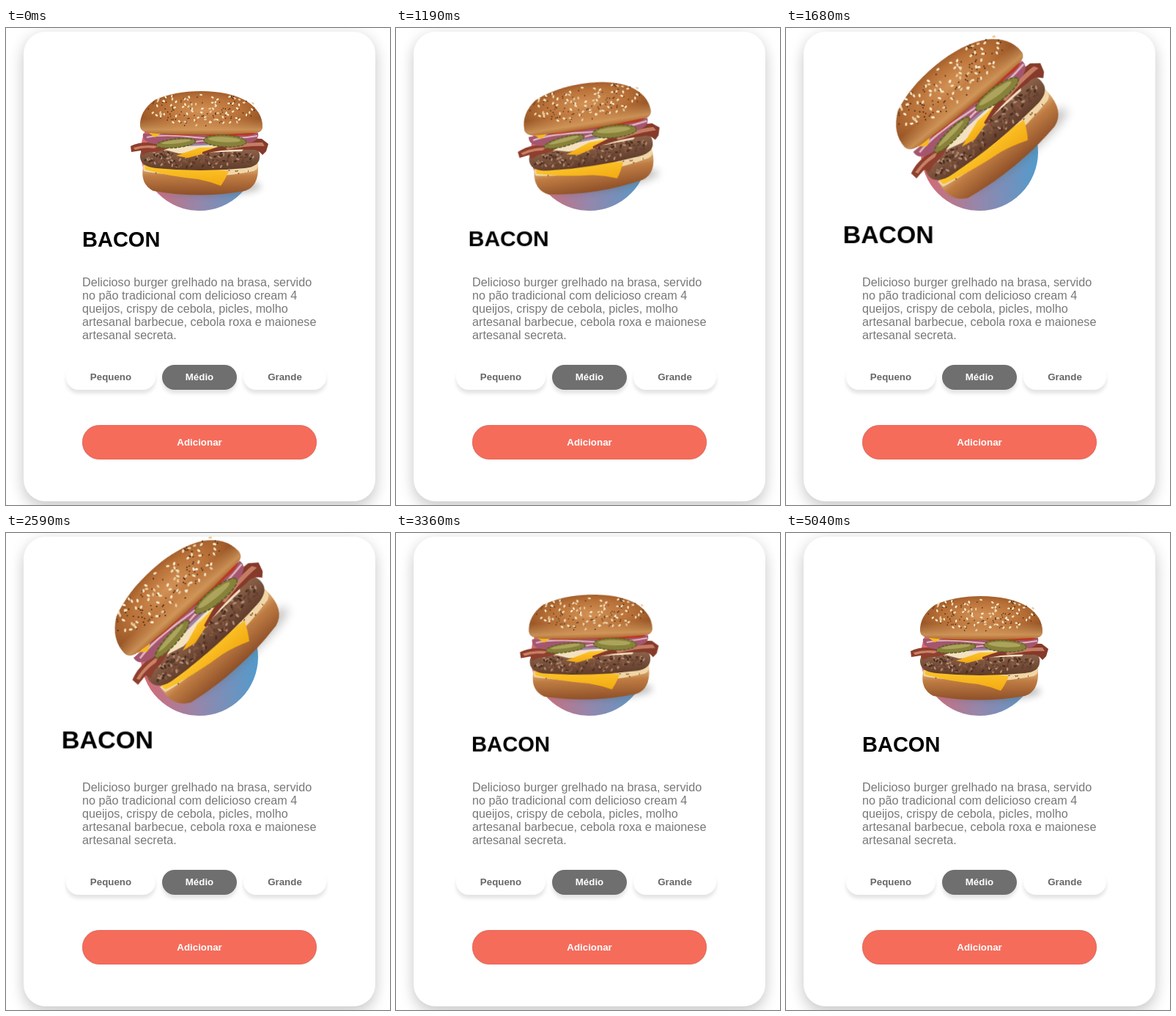
An HTML page for the animation above (5.18 s loop, 524x650 px).

```html
<!DOCTYPE html>
<html lang="pt">
<head>
<meta charset="utf-8">
<title>Bacon</title>
<style>
  html, body {
    margin: 0;
    width: 100%;
    height: 100%;
    overflow: hidden;
    background: #fff;
  }
  .stage {
    position: relative;
    width: 524px;
    height: 650px;
    overflow: hidden;
    perspective: 1000px;
    perspective-origin: 264px 325px;
    font-family: "Liberation Sans", Helvetica, Arial, sans-serif;
  }
  .stage > * { position: absolute; margin: 0; box-sizing: border-box; }

  .card {
    left: 24px; top: 5px; width: 480px; height: 640px;
    border-radius: 30px;
    background: #fff;
    box-shadow: 0 10px 20px rgba(0, 0, 0, .17), 0 0 22px rgba(0, 0, 0, .08);
  }
  .circle {
    left: 184px; top: 89px; width: 160px; height: 160px;
    border-radius: 50%;
    background: linear-gradient(to right, #d9686f, #9487ac 50%, #529bcc);
  }
  .burger {
    left: 0; top: 0; width: 524px; height: 330px;
    transform-origin: 264px 166px;
    --pose: translateZ(200px) rotateZ(-42deg);
    --rest: translateZ(0px) rotateZ(0deg);
  }
  h1 {
    left: 104px; top: 271px;
    font-size: 29px; line-height: 34px; font-weight: bold;
    color: #000;
    --pose: translateZ(150px);
    --rest: translateZ(0px);
  }
  .pop { animation: pop 5180ms infinite; }

  /* lifted from 885 to 1845 ms, lowered from 2590 to 3490 ms */
  @keyframes pop {
    0%      { transform: var(--rest); }
    17.085% { transform: var(--rest); animation-timing-function: ease-in-out; }
    35.618% { transform: var(--pose); }
    50%     { transform: var(--pose); animation-timing-function: ease-in-out; }
    67.375% { transform: var(--rest); }
    100%    { transform: var(--rest); }
  }

  p {
    left: 104px; top: 336.5px;
    font-size: 16.2px; line-height: 18px;
    white-space: nowrap;
    color: #787878;
  }
  .btn {
    top: 459px; height: 34px;
    border-radius: 17px;
    background: #fff;
    color: #666;
    font-size: 13.333px; line-height: 34px; font-weight: bold;
    text-align: center;
    box-shadow: 0 5px 5px rgba(0, 0, 0, .11);
  }
  .on { background: #6f6f6f; color: #fff; }
  .add {
    left: 104px; top: 541px; width: 320px; height: 47px;
    line-height: 47px;
    border-radius: 24px;
    background: #f56c5b;
    color: #fff;
    box-shadow: inset 0 0 1px rgba(90, 60, 60, .6);
  }
</style>
</head>
<body>
<div class="stage">
  <div class="card"></div>
  <div class="circle"></div>

  <svg class="burger pop" viewBox="0 0 524 330">
    <defs>
      <radialGradient id="crust" cx=".5" cy=".45" r=".6">
        <stop offset="0" stop-color="#d39256"/>
        <stop offset=".55" stop-color="#b87037"/>
        <stop offset="1" stop-color="#8a4a1e"/>
      </radialGradient>
      <linearGradient id="rim" x2="0" y2="1">
        <stop offset=".62" stop-color="#e3ac6c" stop-opacity="0"/>
        <stop offset=".88" stop-color="#e3ac6c" stop-opacity=".7"/>
        <stop offset="1" stop-color="#a9622a"/>
      </linearGradient>
      <linearGradient id="heel" x2="0" y2="1">
        <stop offset="0" stop-color="#e5b980"/>
        <stop offset=".35" stop-color="#bf7c43"/>
        <stop offset="1" stop-color="#8f5028"/>
      </linearGradient>
      <linearGradient id="meat" x2="0" y2="1">
        <stop offset="0" stop-color="#94694f"/>
        <stop offset="1" stop-color="#5f3b2a"/>
      </linearGradient>
      <linearGradient id="cheese" x2="0" y2="1">
        <stop offset="0" stop-color="#fcc62b"/>
        <stop offset="1" stop-color="#f3a911"/>
      </linearGradient>
      <filter id="soft" x="-30%" y="-100%" width="160%" height="300%">
        <feGaussianBlur stdDeviation="5"/>
      </filter>
      <path id="dome" d="M183 134Q182 113 203 98Q230 86 266 86Q305 86 329 100Q350 114 350 134Q350 144 335 143Q265 148 197 143Q184 142 183 134Z"/>
    </defs>

    <ellipse cx="278" cy="216" rx="70" ry="12" fill="#555" opacity=".35" filter="url(#soft)"/>

    <path fill="url(#heel)" d="M187 190Q183 213 201 222Q265 233 326 222Q345 216 344 188Z"/>
    <path fill="#f0d6a6" d="M187 187L344 184Q345 192 338 195Q300 203 262 202Q210 200 188 195Z"/>
    <g id="crumbs"></g>
    <path fill="url(#cheese)" d="M189 187L250 188L304 195Q299 207 293 215Q278 209 262 206Q222 202 190 193Z"/>

    <path fill="url(#meat)" d="M183 176Q182 162 202 163L330 160Q348 163 346 177Q345 189 326 191Q265 197 205 191Q184 189 183 176Z"/>
    <g id="grain"></g>

    <path fill="#f4e1c0" d="M206 163L330 157L322 168L236 171Z"/>
    <path fill="url(#cheese)" d="M232 174L264 163L304 162L282 168L248 177Z"/>

    <path fill="#8f3f2d" d="M170 161Q184 154 204 157L226 162Q208 170 196 169L186 173L184 167L171 169Z"/>
    <path fill="#c98268" d="M174 163Q190 158 208 161L202 164Q188 162 176 166Z"/>
    <path fill="#863a2a" d="M268 169Q300 158 330 150L349 151L358 158L355 168L350 173Q343 164 334 166Q300 164 268 172Z"/>
    <path fill="#c47d64" d="M300 163Q325 155 350 156L353 161Q330 160 302 166Z"/>

    <path fill="#a4566e" d="M187 144Q185 156 204 158L330 157Q346 154 344 143Z"/>
    <path fill="none" stroke="#dfb5c2" stroke-width="2.2" d="M192 149Q215 144 258 149T343 147M258 155Q276 152 290 155"/>
    <path fill="#bf3620" d="M214 141L343 140Q340 148 320 146Q300 150 270 146Q235 147 214 145Z"/>

    <g fill="#87813a" stroke="#5c5d26" stroke-width="1.4" stroke-dasharray="4 1.5">
      <ellipse cx="232" cy="157" rx="27" ry="6" transform="rotate(-6 232 157)"/>
      <ellipse cx="299" cy="154" rx="29" ry="8" transform="rotate(3 299 154)"/>
    </g>
    <g fill="#aca45c">
      <ellipse cx="232" cy="155" rx="20" ry="2.4" transform="rotate(-6 232 155)"/>
      <ellipse cx="298" cy="152" rx="22" ry="3.6" transform="rotate(3 298 152)"/>
    </g>

    <path fill="#f7b81f" d="M188 138L216 141L203 149Z"/>
    <use href="#dome" fill="url(#crust)"/>
    <use href="#dome" fill="url(#rim)"/>
    <g id="seeds"></g>
  </svg>

  <h1 class="pop">BACON</h1>
  <p>Delicioso burger grelhado na brasa, servido<br>no pão tradicional com delicioso cream 4<br>queijos, crispy de cebola, picles, molho<br>artesanal barbecue, cebola roxa e maionese<br>artesanal secreta.</p>

  <div class="btn" style="left:82px;width:122px">Pequeno</div>
  <div class="btn on" style="left:213px;width:102px">Médio</div>
  <div class="btn" style="left:324px;width:113px">Grande</div>
  <div class="btn add">Adicionar</div>
</div>

<script>
  let seed = 11;
  const rand = () => (seed = (seed * 16807) % 2147483647) / 2147483647;
  const pick = list => list[Math.floor(rand() * list.length)];

  // Scatters small ellipses over an elliptical area.
  function scatter(id, count, area, size, colors) {
    const [cx, cy, w, h] = area;
    const [rx, ry] = size;
    let out = '';
    for (let i = 0; i < count; i++) {
      const angle = rand() * Math.PI * 2;
      const reach = Math.sqrt(rand());
      const x = (cx + Math.cos(angle) * reach * w).toFixed(1);
      const y = (cy + Math.sin(angle) * reach * h).toFixed(1);
      const turn = Math.round(rand() * 180);
      out += `<ellipse cx="${x}" cy="${y}" rx="${rx}" ry="${ry}" fill="${pick(colors)}" transform="rotate(${turn} ${x} ${y})"/>`;
    }
    document.getElementById(id).innerHTML += out;
  }

  scatter('crumbs', 40, [264, 195, 74, 6], [1.3, .8], ['#8d5a2c', '#fff1d0', '#b5803f']);
  scatter('grain', 190, [265, 177, 78, 13], [2.4, 1.2], ['#4a2d20', '#b08a72', '#84573f', '#65402f']);
  scatter('seeds', 90, [267, 111, 77, 23], [.9, .7], ['#55301a', '#3d2416']);
  scatter('seeds', 75, [267, 111, 77, 23], [2, 1.2], ['#f3e2bf', '#e6cb9a', '#fbefd2']);
</script>
</body>
</html>
```
